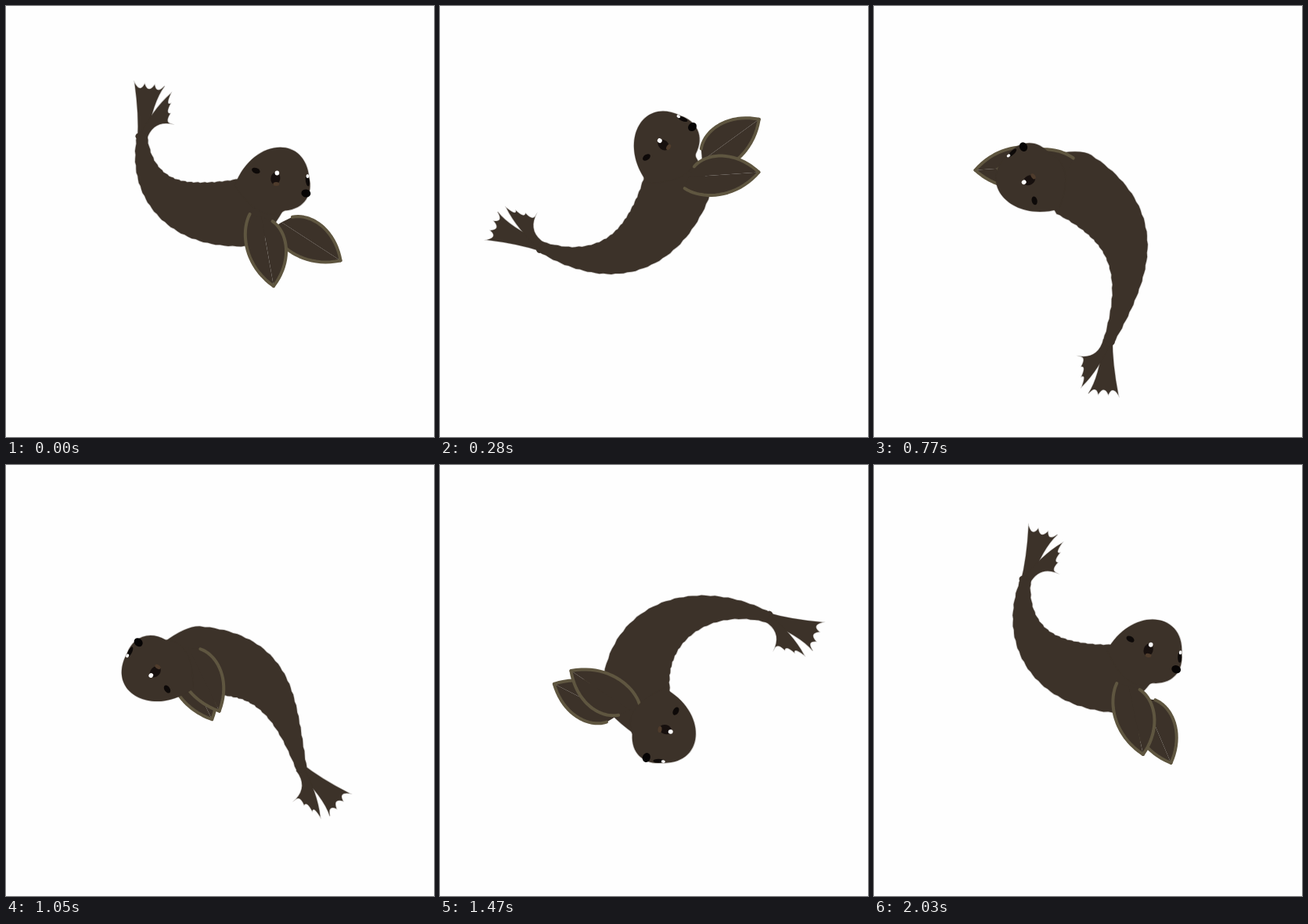
These frames come from a looping animation (547 px wide and 551 px high, 2100 ms). An HTML page with a canvas:

```html
<!DOCTYPE html>
<html lang="en">
<head>
<meta charset="utf-8">
<title>Looping seal</title>
<style>
html, body { margin: 0; width: 100%; height: 100%; overflow: hidden; background: #fefefe; }
canvas { display: block; }
</style>
</head>
<body>
<canvas id="c" width="547" height="551"></canvas>
<script>
const ctx = document.getElementById('c').getContext('2d');
const FUR = '#3c3229', EDGE = '#5f5640', DARK = '#0d0908';
const STEP = 70, COUNT = 30, RAD = Math.PI / 180;
const CENTER = [272, 258], HEAD_ORBIT = 82, FIN = 90;

// Head and tail circle the centre; the rest bends the seal. Angles in degrees.
const key = (step, head, tail, tilt, reach, flick, fin, spread) =>
  ({ step, head, tail, tilt, reach, flick, fin, spread });
const KEYS = [
  key(0, -28, -137, 28, 134, 0, 80, 47),
  key(4, -81, -199, 23, 152, -13, 54, 32),
  key(11, -155, -279, 29, 174, -41, -54, 4),
  key(15, -185, -309, 39, 168, -63, 210, 0),
  key(21, -282, -383, 20, 161, -11, 116, 7),
  key(25, -333, -433, 20, 150, -1, 80, 4),
  key(29, -376, -485, 25, 136, -1, 69, 11)
];

// Smooth looping interpolation without overshoot.
function poseAt(step) {
  const n = KEYS.length;
  let i = n - 1;
  while (KEYS[i].step > step) i--;
  const value = (k, name) => {
    const lap = Math.floor(k / n), v = KEYS[k - lap * n][name];
    if (name === 'step') return v + COUNT * lap;
    return name === 'head' || name === 'tail' ? v - 360 * lap : v;
  };
  const from = value(i, 'step'), span = value(i + 1, 'step') - from;
  const u = (step - from) / span, pose = {};
  for (const name in KEYS[0]) {
    const slope = k => {
      const a = value(k, name) - value(k - 1, name), b = value(k + 1, name) - value(k, name);
      return a * b <= 0 ? 0 : (a + b) / (value(k + 1, 'step') - value(k - 1, 'step'));
    };
    const a = value(i, name), b = value(i + 1, name);
    pose[name] = a + (b - a) * u * u * (3 - 2 * u) +
      span * u * (1 - u) * (slope(i) * (1 - u) - slope(i + 1) * u);
  }
  return pose;
}

const polar = ([x, y], r, deg) => [x + r * Math.cos(deg * RAD), y + r * Math.sin(deg * RAD)];

function bezier(a, b, c, d, t) {
  const s = 1 - t;
  return a.map((_, j) => s * s * s * a[j] + 3 * s * s * t * b[j] + 3 * s * t * t * c[j] + t * t * t * d[j]);
}

function placed([x, y], angle, draw) {
  ctx.save();
  ctx.translate(x, y);
  ctx.rotate(angle * RAD);
  draw();
  ctx.restore();
}

function fur() {
  ctx.closePath();
  ctx.fillStyle = FUR;
  ctx.fill();
  ctx.strokeStyle = 'rgba(60,50,41,.3)';
  ctx.lineWidth = 1.5;
  ctx.stroke();
}

function blob(x, y, rx, ry, color, angle = 0) {
  ctx.fillStyle = color;
  ctx.beginPath();
  ctx.ellipse(x, y, rx, ry, angle * RAD, 0, 7);
  ctx.fill();
}

// One webbed half of the tail, scalloped between its two corners.
function lobe(ax, ay, bx, by, inA, inB) {
  ctx.beginPath();
  ctx.moveTo(-6, 4);
  ctx.quadraticCurveTo(...inA, ax, ay);
  for (let k = 1; k <= 3; k++) {
    const on = (f, a, b) => a + (b - a) * f / 3;
    ctx.quadraticCurveTo(on(k - .5, ax, bx) * .82, on(k - .5, ay, by) * .82, on(k, ax, bx), on(k, ay, by));
  }
  ctx.quadraticCurveTo(...inB, 6, 4);
  fur();
}

function fluke() {
  ctx.scale(.96, .96);
  lobe(-10, -71, 30, -67, [-4, -28], [14, -46]);
  lobe(38, -57, 37, -17, [14, -36], [14, -20]);
  blob(-2, 0, 7, 5, FUR);
}

// Leaf shape; `gap` hides the first part of one edge.
function flipper(root, angle, gap) {
  placed(root, angle, () => {
    const tip = [FIN, 0];
    const edges = [[[-6, 14], [15, 30], [58, 32], gap], [[8, -13], [25, -30], [62, -30], 0]];
    const trace = ([a, b, c], from) => {
      for (let k = 0; k <= 20; k++) ctx.lineTo(...bezier(a, b, c, tip, from + (1 - from) * k / 20));
    };
    ctx.fillStyle = FUR;
    ctx.strokeStyle = EDGE;
    ctx.lineWidth = 4;
    ctx.lineCap = ctx.lineJoin = 'round';
    for (const edge of edges) {
      ctx.beginPath();
      trace(edge, 0);
      ctx.lineTo(0, 0);
      ctx.fill();
    }
    for (const edge of edges) {
      ctx.beginPath();
      trace(edge, edge[3]);
      ctx.stroke();
    }
  });
}

const girth = s => 6.5 + 37 * (s - .05 * Math.sin(2 * Math.PI * s)) + 2.5 * Math.sin(Math.PI * s);

function body(joint, jointDir, shoulder, shoulderDir, chin, nape) {
  const bend = .46 * Math.hypot(shoulder[0] - joint[0], shoulder[1] - joint[1]);
  const p1 = polar(joint, bend, jointDir), p2 = polar(shoulder, -bend, shoulderDir);
  const spine = t => bezier(joint, p1, p2, shoulder, t);
  const belly = [], back = [];
  for (let k = 0; k <= 48; k++) {
    const t = k / 48, [x0, y0] = spine(t - .01), [x1, y1] = spine(t + .01);
    const dir = Math.atan2(y1 - y0, x1 - x0) / RAD;
    const r = girth(t) + .5 * Math.sin(k * 2.1);
    belly.push(polar(spine(t), r, dir + 90));
    back.unshift(polar(spine(t), r, dir - 90));
  }
  ctx.beginPath();
  belly.forEach(p => ctx.lineTo(...p));
  ctx.quadraticCurveTo(...polar(belly[48], 18, shoulderDir), ...chin);
  ctx.lineTo(...nape);
  back.forEach(p => ctx.lineTo(...p));
  fur();
}

function head() {
  ctx.beginPath();
  ctx.moveTo(-52, 10);
  ctx.bezierCurveTo(-30, -50, 38, -56, 43, 0);
  ctx.bezierCurveTo(48, 20, 38, 40, 12, 42);
  ctx.quadraticCurveTo(-20, 60, -52, 10);
  fur();
  blob(-25, -9, 5.5, 3.5, DARK, 22);
  blob(0, 1, 6, 8, '#17100e', 8);
  blob(1, 8, 4, 2.5, '#4f3c2c');
  blob(2, -6, 2.8, 3, '#fff');
  blob(41, 4, 2.5, 7, DARK, -8);
  blob(41, -2, 1.8, 2.5, '#fff');
  blob(39, 20, 6, 5, '#060404', 10);
}

function paint(step) {
  const p = poseAt(step);
  const eye = polar(CENTER, HEAD_ORBIT, p.head), face = p.head + p.tilt;
  const joint = polar(CENTER, p.reach, p.tail), turn = p.tail - KEYS[0].tail;
  const fromEye = (x, y) => polar(polar(eye, x, face), y, face + 90);
  const far = p.fin - p.spread;
  const farRoot = fromEye(-4 + 14 * Math.cos(far * RAD), 46 + 20 * Math.sin(far * RAD));

  ctx.fillStyle = '#fefefe';
  ctx.fillRect(0, 0, 547, 551);
  flipper(farRoot, face + far, 0);
  placed(joint, turn + p.flick, fluke);
  body(joint, turn + 92 + .4 * p.flick, fromEye(-38, 44), face - 7 + .4 * p.flick,
    fromEye(12, 38), fromEye(-46, 5));
  // A flipper folded back merges with the flank along one edge.
  flipper(fromEye(-18, 50), face + p.fin, p.fin > 150 ? .6 : 0);
  placed(eye, face, head);
}

const start = performance.now();
function tick() {
  paint(Math.floor((performance.now() - start) / STEP) % COUNT);
  requestAnimationFrame(tick);
}
tick();
</script>
</body>
</html>
```
